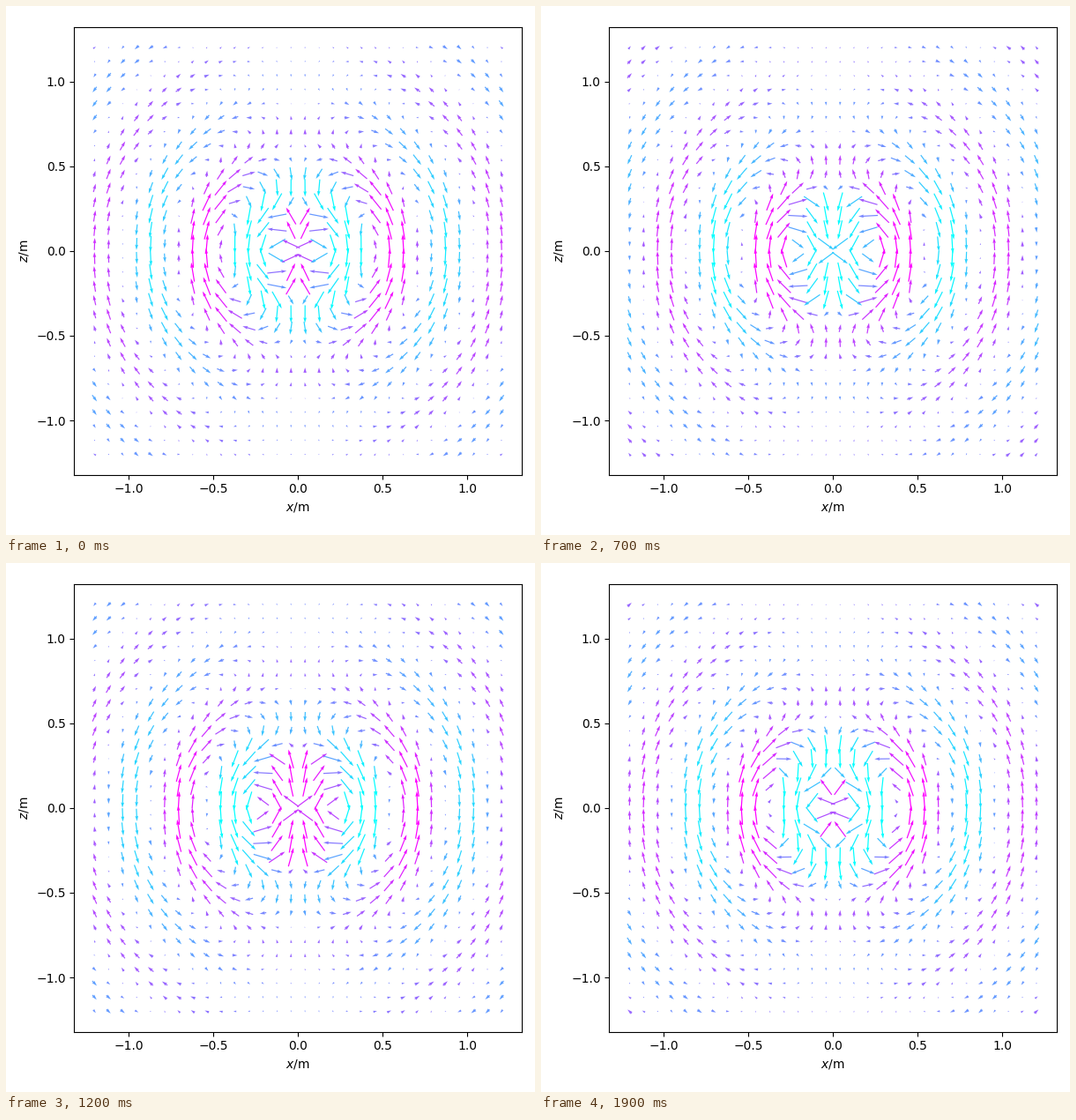
A matplotlib script for the animation above (2 s loop, 600x600 px).

```python
import numpy as np
import matplotlib.pyplot as plt
from matplotlib.animation import FuncAnimation

FRAMES, PERIOD = 20, 10      # frames per loop, frames per oscillation
K = 2 * np.pi / 0.6          # wave number for a 0.6 m wavelength
GAIN = 0.75                  # far-field strength relative to the cap

axis = np.linspace(-1.2, 1.2, 30)
X, Z = np.meshgrid(axis, axis)
R = np.hypot(X, Z)
SIN, COS = X / R, Z / R
KR = K * R


def field(i):
    """Electric field of an oscillating point dipole, capped at length 1."""
    phase = KR - 2 * np.pi * (i % PERIOD) / PERIOD
    near = np.cos(phase) + KR * np.sin(phase)
    far = KR**2 * np.cos(phase)
    amp = GAIN / (R * KR**2)
    e_r = amp * 2 * COS * near
    e_t = amp * SIN * (near - far)
    ex = e_r * SIN + e_t * COS
    ez = e_r * COS - e_t * SIN
    size = np.maximum(np.hypot(ex, ez), 1)
    return ex / size, ez / size


fig, ax = plt.subplots(figsize=(6, 6), dpi=100)
ex, ez = field(0)
arrows = ax.quiver(X, Z, ex, ez, ez, cmap="cool", clim=(-1, 1),
                   pivot="mid", scale=23, scale_units="width")
ax.set_aspect("equal")
ax.set_xlabel("$x$/m")
ax.set_ylabel("$z$/m")
fig.tight_layout()


def update(i):
    ex, ez = field(i)
    arrows.set_UVC(ex, ez, ez)
    return arrows,


anim = FuncAnimation(fig, update, frames=FRAMES, interval=100, repeat=True)
plt.show()
```
